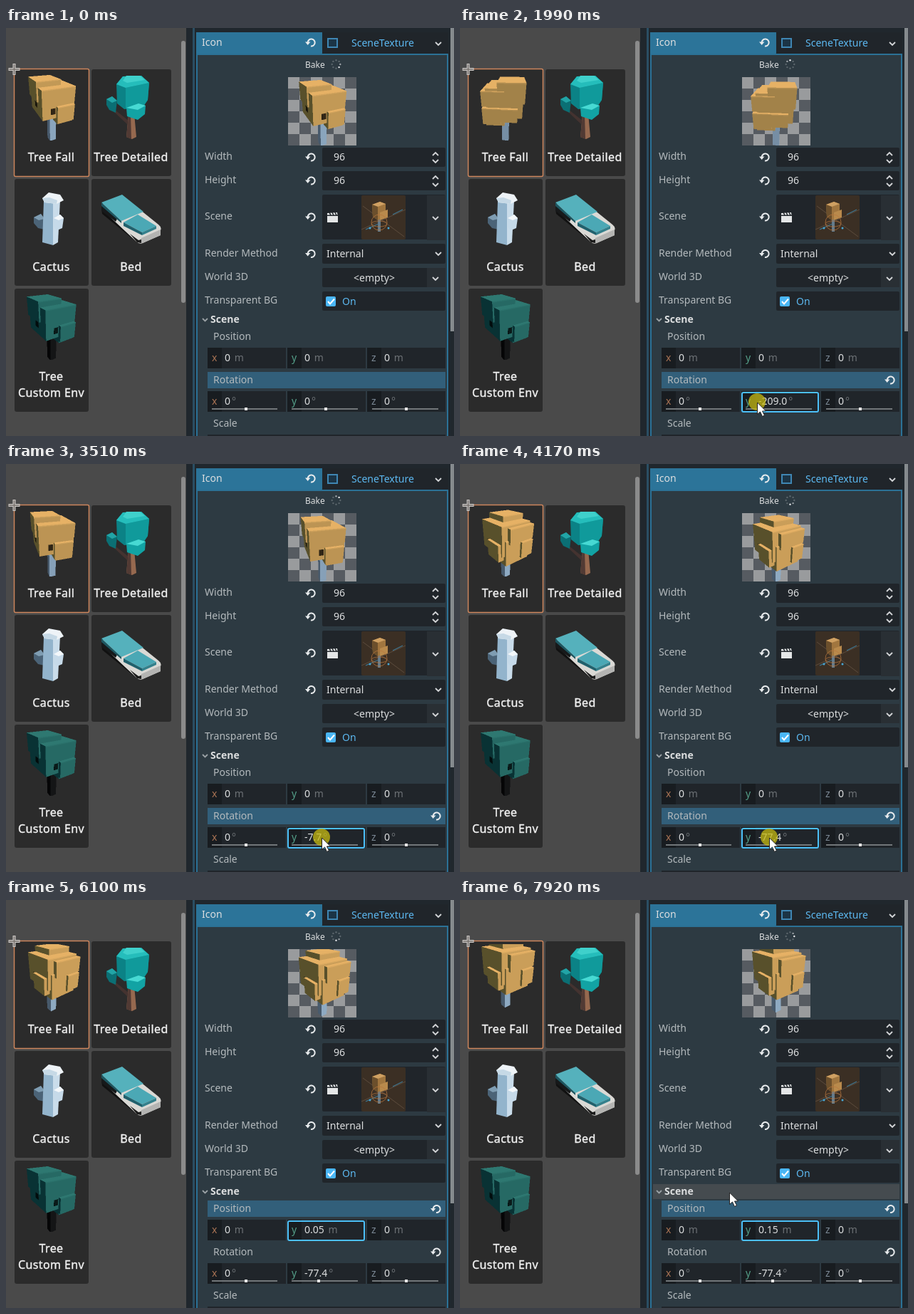
An HTML page with a canvas that plays this animation: 629 by 573 pixels, repeating every 8000 ms.

```html
<!DOCTYPE html>
<html lang="en">
<head>
<meta charset="utf-8">
<title>Scene icon baking</title>
<style>
html, body { margin: 0; width: 100%; height: 100%; overflow: hidden; background: #4a4a4a; }
svg, canvas { position: absolute; display: block; }
svg { left: 0; top: 0; }
text { font: 14px "Noto Sans", sans-serif; fill: #dcdedf; white-space: pre; }
.label { fill: #b4babd; }
.name { font-size: 16px; letter-spacing: .4px; text-anchor: middle; fill: #f0f0f0; stroke: #f0f0f0; stroke-width: .4px; }
.blue { fill: #5cb8f0; }
.unit { fill: #6c7175; }
.field { fill: #20252a; }
.line { fill: none; stroke: #d4d6d8; stroke-width: 1.8; }
</style>
</head>
<body>
<svg width="629" height="573" viewBox="0 0 629 573">
  <defs>
    <g id="revert">
      <path d="M-4.3-.5A5 5 0 1 1 0 5" fill="none" stroke="#e8ebed" stroke-width="2"/>
      <path d="M-8-1h7.4L-4.3 3.6z" fill="#e8ebed"/>
    </g>
    <path id="chev" class="line" d="M-4-2L0 2 4-2"/>
    <pattern id="checks" x="396" y="69" width="32" height="32" patternUnits="userSpaceOnUse">
      <path d="M0 0h32v32H0z" fill="#565b61"/><path d="M0 0h16v16H0zM16 16h16v16H16z" fill="#999b9d"/>
    </pattern>
  </defs>

  <!-- item list -->
  <rect width="253" height="573" fill="#4a4a4a"/>
  <rect x="246" y="18" width="6" height="368" rx="3" fill="#8b8b8b"/>
  <g fill="#2b2b2b">
    <rect x="11.500" y="57.500" width="105" height="151" rx="2" stroke="#cc855c" stroke-width="1.500"/>
    <rect x="120" y="58" width="112" height="150" rx="3"/>
    <rect x="12" y="212" width="104" height="150" rx="3"/>
    <rect x="120" y="212" width="112" height="150" rx="3"/>
    <rect x="12" y="366" width="104" height="173" rx="3"/>
  </g>
  <path d="M11.500 50v16M3.500 58h16" stroke="#c9c6c3" stroke-width="4"/>
  <path d="M11.500 51v14M4.500 58h14" stroke="#77716d" stroke-width="1.500"/>
  <text class="name" x="63.500" y="187">Tree Fall</text>
  <text class="name" x="175.500" y="187">Tree Detailed</text>
  <text class="name" x="63.500" y="341">Cactus</text>
  <text class="name" x="175.500" y="341">Bed</text>
  <text class="name" x="63.500" y="495">Tree</text>
  <text class="name" x="63.500" y="518">Custom Env</text>

  <!-- detailed tree -->
  <path d="M146 112l7 3 19 15-2 5-17-16z" fill="#443330"/>
  <path d="M172 122l8-2 3 33-6 3-8-3z" fill="#96694f"/><path d="M172 122l3-1 1 35-7-3z" fill="#513a34"/>
  <path d="M141 100l8-4 7 6-2 17-9-4-4-7z" fill="#0b6f74"/><path d="M141 100l8-4 7 6-7 3z" fill="#22a4a6"/>
  <path d="M155 79l9-11 26-1 11 10-2 24-7 11-26 2-10-8z" fill="#0b8286"/>
  <path d="M168 84l33-7-2 24-7 10-24 2z" fill="#109a9b"/>
  <path d="M155 79l9-11 26-1 11 10-33 7z" fill="#25bdbb"/>
  <path d="M164 74l5-7h19l7 6-25 4z" fill="#3fd0cb"/>
  <path d="M169 112l17-6 10 3-1 12-10 8-15-5z" fill="#12a3a4"/>
  <path d="M169 112l17-6 10 3-11 6z" fill="#47d9d3"/>

  <!-- cactus -->
  <path d="M39 266l10-5 5 7v15l-9-2-6-7z" fill="#4b6377"/><path d="M39 266l10-5 5 7-8 2z" fill="#7f9db2"/>
  <path d="M53 243l13 3v59l-15-4z" fill="#93b4cc"/><path d="M66 246l10-4-3 59-7 4z" fill="#c9dcea"/>
  <path d="M51 239l9-8 16 3 5 8-10 5-17-2z" fill="#eef3f7"/><path d="M51 239l3 6 17 2 1-5-11-4z" fill="#c6d9e6"/>
  <path d="M67 267l9-5 5 5-2 14-7 3-5-4z" fill="#c6dae9"/><path d="M67 267l9-5 5 5-7 3z" fill="#f3f7fa"/>

  <!-- bed -->
  <path d="M134 253l52 45-1 4-50-41z" fill="#111"/>
  <path d="M134 248l29-13 51 41q5 4 3 8v7l-25 11q-5 2-9-2l-47-44z" fill="#dad9d5"/>
  <path d="M134 248l22 20-2 4-20-15z" fill="#17191a"/>
  <path d="M190 295l27-12v8l-25 11q-3 1-6-1z" fill="#b4b4b2"/><path d="M174 289l12 9 4-1v5l-6-1z" fill="#1b1b1b"/>
  <path d="M134 245l29-11 30 24-31 13z" fill="#55b1bc"/><path d="M134 245l28 26v3l-28-24z" fill="#1d5660"/>
  <path d="M165 273l20-11 26 16-20 9z" fill="#4ba8b5"/><path d="M165 273l26 14v4l-26-13z" fill="#20606c"/>
  <path d="M191 287l20-9v4l-20 9z" fill="#34808c"/>

  <!-- inspector -->
  <rect x="253" width="376" height="573" fill="#20272d"/>
  <rect x="262" width="3" height="573" fill="#2a4e63"/>
  <rect x="624" width="5" height="426" fill="#858a8e"/>
  <rect x="268" y="7" width="352" height="580" fill="#2d3a42" stroke="#2b7196" stroke-width="2"/>
  <rect x="267" y="6" width="177" height="31" rx="2" fill="#2c7499"/>
  <rect class="field" x="444" y="6" width="177" height="30"/>
  <path d="M267 37h354" stroke="#2b7196" stroke-width="2"/>
  <rect x="452" y="15" width="13" height="12" fill="#1b3446" stroke="#3f86b3" stroke-width="2"/>
  <text x="275" y="25">Icon</text>
  <text class="blue" x="485" y="26">SceneTexture</text>
  <text x="420" y="56" style="font-size:12px">Bake</text>
  <g id="spin" transform="translate(463.500 51)"></g>
  <rect x="396" y="69" width="96" height="96" fill="url(#checks)"/>
  <g id="rows"></g>
  <text x="460" y="186">96</text><text x="460" y="219">96</text>
  <path class="line" d="M599 179l4-4 4 4M599 185l4 4 4-4M599 212l4-4 4 4M599 218l4 4 4-4"/>
  <text x="450" y="322">Internal</text>
  <text x="517" y="356" text-anchor="middle">&lt;empty&gt;</text>
  <path d="M591 235h26v63h-26zM591 337h26v27h-26z" fill="#292f34"/>
  <rect x="449" y="377" width="14" height="14" rx="2" fill="#4ab6f5"/>
  <path d="M452 384l3 3.500 6-7" fill="none" stroke="#fff" stroke-width="2"/>
  <text class="blue" x="472" y="389">On</text>
  <path d="M451 264h15v9h-15zM451 260l14-1 .5 3.500H451z" fill="#e4e6e7"/>
  <path d="M454 259l2 4m2-4l2 4m2-4l2 4" stroke="#20252a" stroke-width="1.500"/>
  <g id="chevs"></g>

  <!-- scene thumbnail -->
  <rect x="499" y="235" width="62" height="62" rx="2" fill="#3b2f24"/>
  <path d="M499 283l62-28M501 250l58 43" stroke="#5c4c3d" fill="none"/>
  <path d="M505 283l18-8M543 262l14-7" stroke="#3d7590" stroke-width="1.200"/>
  <path d="M522 268h4v18h-4z" fill="#647b8b"/>
  <path d="M514 248l11-4 8 3v19l-11 4-7-5z" fill="#a1763f"/>
  <path d="M514 248l11-4 8 3-11 4z" fill="#cfa062"/><path d="M514 248l8 3v19l-7-5z" fill="#6b4f2c"/>
  <path d="M525 259l11-4v11l-11 4z" fill="#b98a4c"/>
  <g fill="none" stroke="#b9773f" opacity=".75"><circle cx="524" cy="273" r="11"/><ellipse cx="524" cy="275" rx="11" ry="4"/></g>
  <circle cx="511" cy="281" r="1.500" fill="#49a8d5"/><circle cx="537" cy="281" r="1.500" fill="#49a8d5"/>

  <!-- scene section -->
  <rect id="sceneBar" x="271" y="399" width="346" height="21" fill="#454b4f"/>
  <path d="M276 408l3.500 3.500 3.500-3.500" class="line" style="stroke:#9aa1a5"/>
  <text x="287" y="414" style="font-weight:700">Scene</text>
  <rect id="hot" x="283" width="334" height="23" fill="#325f7a"/>
  <text class="label" x="291" y="438">Position</text>
  <text class="label" x="291" y="499">Rotation</text>
  <text class="label" x="291" y="560">Scale</text>
  <rect class="field" x="283" y="571" width="334" height="2"/>
  <g id="axes"></g>
  <g stroke="#72777a" stroke-width="2"><path d="M289 535h92M401 535h93M514 535h93"/></g>
  <g fill="#e6e6e6"><rect x="335" y="533" width="4" height="4"/><rect x="560" y="533" width="4" height="4"/>
    <rect id="grab" y="533" width="4" height="4"/></g>
  <rect id="focus" x="396" width="107" height="27" rx="2" fill="none" stroke="#4cc0f8" stroke-width="2"/>
  <use id="posRevert" href="#revert" x="604" y="434"/>
  <use id="rotRevert" href="#revert" x="604" y="494.500"/>
  <g id="cursor">
    <circle id="press" r="12" fill="#c6ba12" opacity=".75"/>
    <path d="M.5 1v16.500l4-3.500 3 6.500 3-1.500-3-6h5z" fill="#fff" stroke="#222" stroke-width="1"/>
  </g>
</svg>
<script>
const $ = id => document.getElementById(id);
const show = (id, on) => $(id).style.display = on ? '' : 'none';

// Static rows
$('rows').innerHTML = [
  ['Width', 168, 27], ['Height', 201, 27], ['Scene', 234, 63],
  ['Render Method', 303, 28], ['World 3D', 337, 27], ['Transparent BG', 370, 27]
].map(([name, y, h], i) =>
  `<rect class="field" x="444" y="${y}" width="173" height="${h}" rx="2"/>` +
  `<text class="label" x="279" y="${Math.floor(y + h / 2 + 4)}">${name}</text>` +
  (i < 4 ? `<use href="#revert" x="428" y="${y + h / 2}"/>` : '')
).join('') + '<use href="#revert" x="428" y="20.500"/>';

$('chevs').innerHTML = [[607, 22], [603, 267], [607, 317], [603, 352]]
  .map(([x, y]) => `<use href="#chev" x="${x}" y="${y}"/>`).join('');

const axes = [['x', 283, '#a97354'], ['y', 395, '#55a089'], ['z', 507, '#7c8996']];
$('axes').innerHTML = [['pos', 449, ' m'], ['rot', 510, '°']].map(([id, y, unit]) =>
  axes.map(([a, x, color]) =>
    `<rect class="field" x="${x}" y="${y}" width="110" height="29"/>` +
    `<rect x="${x}" y="${y}" width="20" height="29" fill="#181c20"/>` +
    `<text x="${x + 6}" y="${y + 19}" style="fill:${color}">${a}</text>` +
    `<text x="${x + 24}" y="${y + 19}"><tspan id="${id + a}">0</tspan>` +
    `<tspan class="unit" dx="2">${unit}</tspan></text>`
  ).join('')).join('');

const dots = 8;
$('spin').innerHTML = Array.from({length: dots}, (_, i) => {
  const a = i / dots * 2 * Math.PI;
  return `<circle cx="${5.8 * Math.sin(a)}" cy="${-5.8 * Math.cos(a)}" r="1.200" fill="#e8eaec"/>`;
}).join('');

// Boxes as x0, x1, y0, y1, z0, z1: the trunk first, two dark hollows last
const boxes = [
  [-5, 5, -57, 0, -5, 5],
  [-22, 22, -6, 32, -22, 22], [0, 24, -19, 14, -20, 18],
  [-24, 8, 14, 39, -23, 10], [-4, 20, -12, 10, 2, 26],
  [4, 27, -14, 8, -25, -5], [-16, 4, -10, 8, -26, -6],
  [0, 27, 10, 29, -24, 14],
  [-11, -5, 0, 8, 20, 22.3], [-22.3, -20, 4, 12, -4, 4]
];
const hollow = boxes.length - 2;
const fall = {leaf: [[88, 80, 43], [230, 177, 101]], wood: [[72, 90, 108], [160, 190, 216]]};
const night = {leaf: [[9, 50, 52], [46, 120, 113]], wood: [[5, 5, 6], [24, 26, 26]]};
const size = 192, dist = 160, tilt = 0.44, yaw = 25, light = [0.5, 0.8, 0.35];

const buffer = document.createElement('canvas');
buffer.width = buffer.height = size;
const bufferCtx = buffer.getContext('2d');

// Casts one ray per sample against the rotated boxes
function bake(deg, lift, paint) {
  const img = bufferCtx.createImageData(size, size);
  const a = (deg + yaw) * Math.PI / 180, c = Math.cos(a), s = Math.sin(a);
  const st = Math.sin(tilt), ct = Math.cos(tilt);
  const eye = [-dist * ct * s, dist * st - lift * 73, dist * ct * c];
  for (let p = 0; p < size * size; p++) {
    const u = (p % size + 0.5) / 2 - 48, v = 48 - (Math.floor(p / size) + 0.5) / 2;
    const dz = -dist * ct - v * st;
    const dir = [u * c - dz * s, -dist * st + v * ct, u * s + dz * c];
    let best = 1e9, axis = -1, hit = 0;
    for (let b = 0; b < boxes.length; b++) {
      const box = boxes[b];
      let near = -1e9, far = 1e9, k = 0;
      for (let i = 0; i < 3; i++) {
        const p0 = (box[2 * i] - eye[i]) / dir[i], p1 = (box[2 * i + 1] - eye[i]) / dir[i];
        const lo = Math.min(p0, p1);
        if (lo > near) { near = lo; k = i; }
        far = Math.min(far, Math.max(p0, p1));
      }
      if (near < far && near < best) { best = near; axis = k; hit = b; }
    }
    if (axis < 0) continue;
    const n = -Math.sign(dir[axis]);
    let lit = axis === 1 ? n * light[1]
      : axis === 0 ? n * (c * light[0] - s * light[2])
      : n * (s * light[0] + c * light[2]);
    const edge = boxes[hit][3] - eye[1] - best * dir[1];
    if (axis !== 1 && edge < 1.2 && hit > 0) lit += 0.12;
    const mix = Math.pow(Math.min(1, Math.max(0, lit) * 1.25), 0.7);
    const [dark, bright] = hit ? paint.leaf : paint.wood;
    const dim = hit >= hollow ? 0.25 : 1;
    for (let i = 0; i < 3; i++) img.data[4 * p + i] = dim * (dark[i] + (bright[i] - dark[i]) * mix);
    img.data[4 * p + 3] = 255;
  }
  bufferCtx.putImageData(img, 0, 0);
}

function icon(x, y) {
  const el = document.createElement('canvas');
  el.width = el.height = 96;
  el.style.cssText = `left:${x}px;top:${y}px`;
  document.body.append(el);
  const ctx = el.getContext('2d');
  ctx.imageSmoothingQuality = 'high';
  return () => { ctx.clearRect(0, 0, 96, 96); ctx.drawImage(buffer, 0, 0, 96, 96); };
}

bake(8, 0, night);
icon(16, 370)();
const icons = [icon(16, 62), icon(396, 69)];

// Motion: [time, value]
const drag = [[700, 0], [1020, 5], [1450, 14], [2050, 28], [2540, 28], [2840, 20], [3400, 2], [3560, 0], [3720, 0], [4120, 10]];
const lifts = [[4860, 0], [5260, 0.37], [5480, 0.46], [6000, 0.15], [6550, -0.42], [6710, -0.49], [6830, -0.47], [7430, 0.15]];
const cursorX = [[300, 468], [660, 444], [4230, 434], [4750, 430], [7800, 372], [7900, 378]];
const cursorY = [[300, 573], [660, 528], [1450, 528], [2050, 525], [2840, 525], [3400, 524], [4230, 524], [4750, 463], [7800, 356], [7900, 410]];

function at(keys, t) {
  if (t <= keys[0][0]) return keys[0][1];
  for (let i = 1; i < keys.length; i++) {
    const [t0, v0] = keys[i - 1], [t1, v1] = keys[i];
    if (t < t1) return v0 + (v1 - v0) * (t - t0) / (t1 - t0);
  }
  return keys[keys.length - 1][1];
}

let last = '';
function draw(t) {
  const steps = Math.round(at(drag, t));
  const deg = -steps * 720 / 93, lift = Math.round(at(lifts, t) * 100) / 100;
  const key = steps + ',' + lift;
  if (key !== last) {
    last = key;
    bake(deg, lift, fall);
    icons.forEach(paint => paint());
    $('roty').textContent = steps ? deg.toFixed(1) : '0';
    $('posy').textContent = lift ? String(lift) : '0';
    $('grab').setAttribute('x', 447 + deg * 46.5 / 360);
  }
  const moving = t >= 4800;
  $('hot').setAttribute('y', moving ? 422 : 483);
  $('focus').setAttribute('y', moving ? 451 : 512);
  show('focus', t >= 680);
  show('rotRevert', steps);
  show('posRevert', lift);
  show('sceneBar', t >= 7890);

  const dragging = t >= 680 && t < 4230;
  const x = dragging ? 444 - steps : Math.round(at(cursorX, t));
  $('cursor').setAttribute('transform', `translate(${x} ${Math.round(at(cursorY, t))})`);
  show('cursor', t >= 300 && t < 4850 || t >= 7800);
  show('press', dragging);

  // The busy ring only turns while icons are being baked
  const busy = Math.max(240, Math.min(t, 7430));
  const turn = Math.floor(busy / 60) + 7;
  [...$('spin').children].forEach((dot, i) => {
    const age = ((turn - i) % dots + dots) % dots;
    dot.setAttribute('opacity', age === 0 ? 1 : age === 1 ? 0.6 : 0.25);
  });
}

function loop() {
  draw(performance.now() % 8000);
  requestAnimationFrame(loop);
}
loop();
</script>
</body>
</html>
```
